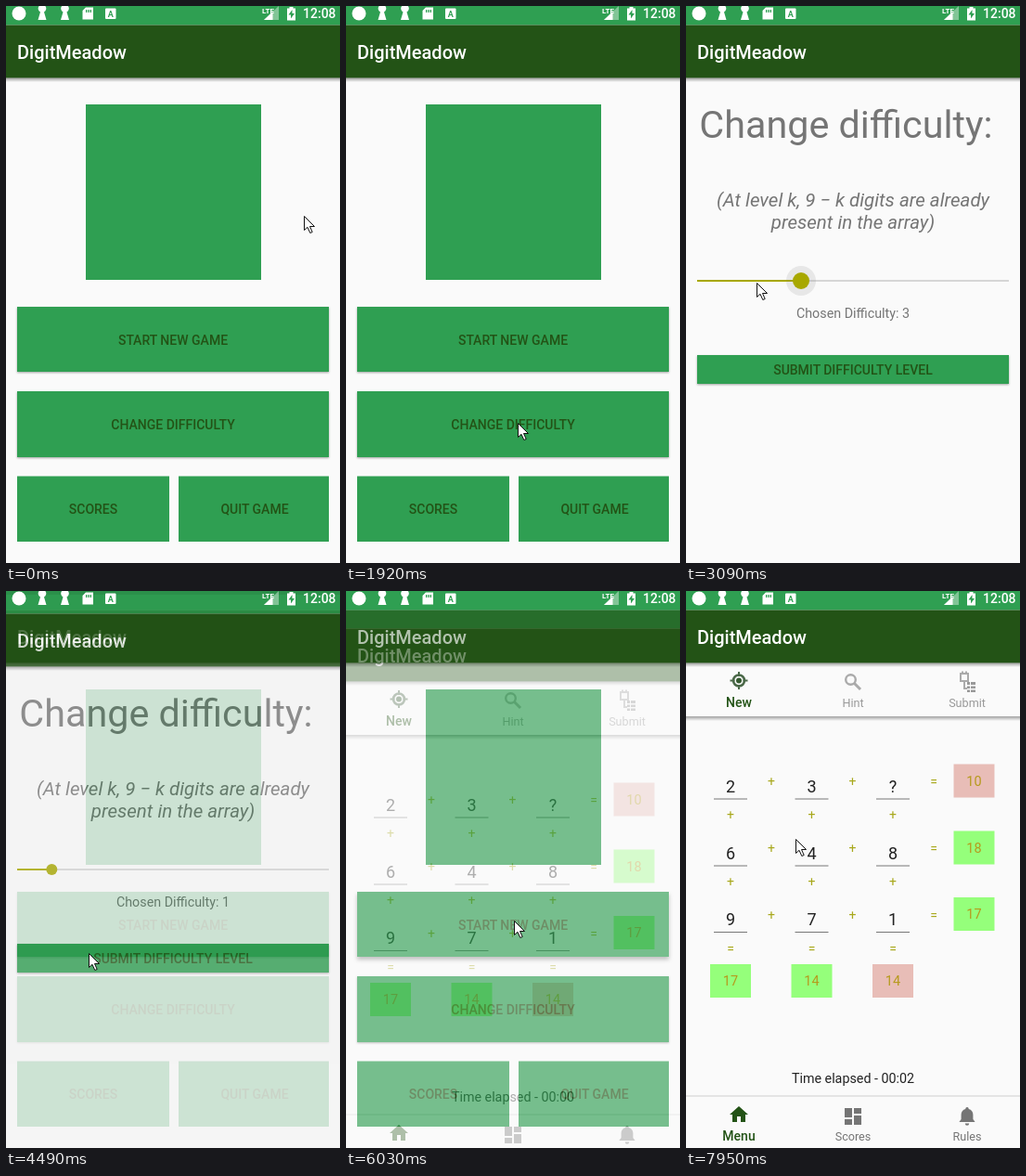
An HTML page for the animation above (8000 ms loop, 360 by 600 pixels).

```html
<!DOCTYPE html>
<html lang="en">
<head>
<meta charset="utf-8">
<title>Number puzzle</title>
<style>
  html, body { margin: 0; width: 100%; height: 100%; overflow: hidden; background: #fafafa; }
  svg { display: block; width: 360px; height: 600px; font-family: Roboto, sans-serif; }
  .green { fill: #2f9f52; }
  .dark { fill: #235316; }
  .raised { filter: drop-shadow(0 1px 1px rgba(0, 0, 0, .35)); }
  .mid text, text.mid { text-anchor: middle; }
  .caps { font-size: 14px; font-weight: 500; fill: #235316; }
  .grey { fill: #757575; }
  .soft { fill: #999; }
  .label { font-size: 12.6px; }
  .active { font-size: 14px; font-weight: 500; fill: #235316; }
  .digit { font-size: 18px; fill: #222; }
  .sign { font-size: 14px; fill: #a8a81c; }
  .sum { font-size: 14.5px; fill: #b69a1c; }
</style>
</head>
<body>
<svg viewBox="0 0 360 600">
  <defs>
    <linearGradient id="fade" x2="0" y2="1">
      <stop offset="0" stop-color="#000" stop-opacity=".36"/>
      <stop offset="1" stop-color="#000" stop-opacity="0"/>
    </linearGradient>
    <g id="bars">
      <rect width="360" height="600" fill="#fafafa"/>
      <rect class="green" width="360" height="20.5"/>
      <rect class="dark" y="20.5" width="360" height="57"/>
      <rect y="77.5" width="360" height="4.5" fill="url(#fade)"/>
      <text x="12" y="57" font-size="20" font-weight="500" fill="#fff">DigitMeadow</text>
    </g>
    <path id="pawn" fill="#fff" d="M-2 6.5a4.3 4.3 0 1 1 4 0L4.5 15h-9z"/>
  </defs>

  <g id="home">
    <use href="#bars"/>
    <rect class="green" x="86" y="106" width="189" height="189"/>
    <rect id="start" class="green raised" x="12" y="324" width="336" height="70"/>
    <rect id="change" class="green raised" x="12" y="415" width="336" height="71"/>
    <rect class="green" x="12" y="506.5" width="164" height="70.5"/>
    <rect class="green" x="186" y="506.5" width="162" height="70.5"/>
    <g class="mid caps">
      <text x="180" y="364.5">START NEW GAME</text>
      <text x="180" y="456">CHANGE DIFFICULTY</text>
      <text x="94" y="547">SCORES</text>
      <text x="268" y="547">QUIT GAME</text>
    </g>
    <rect id="dim" width="360" height="600" opacity="0"/>
  </g>

  <g id="level">
    <use href="#bars"/>
    <text class="grey" x="14.3" y="142" font-size="41.3">Change difficulty:</text>
    <g class="mid grey" font-size="20.5" font-style="italic">
      <text x="180" y="215.5">(At level k, 9 − k digits are already</text>
      <text x="180" y="240">present in the array)</text>
    </g>
    <path d="M12 296H348" stroke="#d6d6d6" stroke-width="2"/>
    <path id="filled" stroke="#a8a800" stroke-width="2"/>
    <circle id="halo" cy="296" r="16" fill="#888" fill-opacity=".16"/>
    <circle id="thumb" cy="296" fill="#a8a800"/>
    <text id="chosen" class="mid grey" x="180" y="336" font-size="14.3"></text>
    <rect id="submit" class="green raised" x="12" y="376" width="336" height="31"/>
    <text class="mid caps" x="180" y="397">SUBMIT DIFFICULTY LEVEL</text>
  </g>

  <g id="game">
    <use href="#bars"/>
    <rect y="135" width="360" height="5" fill="url(#fade)"/>
    <g fill="none" stroke="#4a6848">
      <circle cx="57" cy="96.5" r="6" stroke-width="2.5"/>
      <path d="M57 87v5m0 9v5M47.500 96.500h5m9 0h5" stroke-width="2"/>
    </g>
    <circle cx="57" cy="96.500" r="3" fill="#355a30"/>
    <g fill="none" stroke="#aaa">
      <circle cx="177.500" cy="95.500" r="5.300" stroke-width="2.400"/>
      <path d="M181.500 99.500L188 106" stroke-width="3"/>
      <path d="M296 89h8v8h-8zM298 86.500v2m4-2v2M300 97v8h3" stroke-width="2"/>
    </g>
    <path d="M303 98h3v3h-3zm4 0h5v3h-5zm-4 4.500h3v2.500h-3zm4 0h5v2.500h-5zm-4 4h3v2.500h-3zm4 0h5v2.500h-5z" fill="#999"/>
    <g class="mid label">
      <text class="active" x="57" y="125">New</text>
      <text class="soft" x="180" y="125">Hint</text>
      <text class="soft" x="303" y="125">Submit</text>
    </g>
    <g id="grid" class="mid"></g>
    <text id="clock" class="mid" x="180" y="530" font-size="14.3" fill="#222"></text>
    <path d="M0 544H360" stroke="#e4e4e4" stroke-width="2"/>
    <path class="dark" d="M57 555l10 9h-3v8h-5v-6h-4v6h-5v-8h-3z"/>
    <path class="grey" d="M171 557h8v10h-8zm10 0h8v6h-8zm-10 12h8v6h-8zm10-4h8v10h-8z"/>
    <path class="grey" d="M303 556c1.500 0 1.700 1 1.700 2 3 .8 4.700 3 4.700 6v5l2.200 3h-17.200l2.200-3v-5c0-3 1.700-5.200 4.700-6 0-1 .2-2 1.700-2zm-2.200 17.500h4.400a2.200 2.200 0 0 1-4.400 0z"/>
    <g class="mid label">
      <text class="active" x="57" y="592">Menu</text>
      <text class="grey" x="180" y="592">Scores</text>
      <text class="grey" x="303" y="592">Rules</text>
    </g>
  </g>

  <g id="status" fill="#fff">
    <circle cx="14" cy="8" r="7.500"/>
    <use href="#pawn" x="39"/>
    <use href="#pawn" x="63.500"/>
    <path d="M86 1.500h8v13H82.500V5z"/>
    <path class="green" d="M86 4h1.300v3H86zm2.300 0h1.300v3h-1.300zm2.300 0h1.300v3h-1.300z"/>
    <rect x="107" y="2.500" width="11.500" height="11.500" rx="1"/>
    <text class="mid green" x="112.800" y="11.500" font-size="9" font-weight="700">A</text>
    <path d="M294 0V15H278z" opacity=".4"/>
    <path d="M287.500 6V15H278z"/>
    <text x="276" y="7.500" font-size="8" font-weight="700">LTE</text>
    <path d="M303 2.500h2.500V1h4v1.500h2.500V15.500h-9z"/>
    <path class="green" d="M308.500 4l-4 5.500h2.500v4l4-5.500h-2.500z"/>
    <text x="320" y="13" font-size="14" font-weight="500">12:08</text>
  </g>

  <path id="cursor" d="M.5.5V15.500L4 12.300l2.800 6.200 2.400-1-2.700-6H11.500z" fill="#fff" stroke="#111"/>
</svg>
<script>
const LOOP = 8000;
const $ = id => document.getElementById(id);
const el = Object.fromEntries(
  ['start', 'change', 'submit', 'dim', 'level', 'game', 'filled', 'halo', 'thumb', 'chosen', 'clock', 'cursor']
    .map(id => [id, $(id)]));

// Puzzle board
const cols = [48, 135.5, 223], rows = [216, 288, 359.5];
const text = (kind, x, y, s) => `<text class="${kind}" x="${x}" y="${y}">${s}</text>`;
const total = (x, y, n, ok) =>
  `<rect x="${x - 22}" y="${y - 24}" width="44" height="36" fill="${ok ? '#95ff7b' : '#e8bdb7'}"/>` +
  text('sum', x, y - 1, n);
let board = '';
rows.forEach((y, r) => {
  cols.forEach((x, c) => {
    board += text('digit', x, y + .5, ['23?', '648', '971'][r][c]) +
      `<path d="M${x - 18} ${y + 8}h36" stroke="#777"/>` +
      text('sign', x + 44, y - 6, c < 2 ? '+' : '=') +
      text('sign', x, y + 30, r < 2 ? '+' : '=');
  });
  board += total(310.5, y - 5.5, [10, 18, 17][r], r > 0);
});
cols.forEach((x, c) => board += total(x, 426, [17, 14, 14][c], c < 2));
$('grid').innerHTML = board;

// Pointer moves: first step, last step, number of steps, points on the way
const moves = [
  [380, 1150, 11, [[321, 226], [288, 325], [228, 425], [199, 451]]],
  [1230, 1690, 7, [[199, 451], [185, 449]]],
  [2003, 2310, 5, [[185, 449], [222, 365], [237, 301]]],
  [2460, 2460, 1, [[237, 301], [237, 300]]],
  [2630, 3090, 7, [[237, 300], [170, 297], [120, 296], [76, 298]]],
  [3168, 3400, 4, [[76, 298], [46, 299]]],
  [3700, 3940, 4, [[46, 299], [65, 345], [89, 390]]],
  [4880, 5340, 7, [[89, 390], [81, 425], [95, 450], [118, 457], [142, 449], [167, 422], [180, 382], [181, 357]]],
  [6030, 6260, 4, [[181, 357], [180, 345]]],
  [6420, 7180, 11, [[180, 345], [120, 310], [60, 240], [85, 180], [160, 166], [215, 185]]],
  [7260, 7950, 10, [[215, 185], [245, 235], [225, 285], [165, 295], [118, 267]]]
];

// Number of steps done at time t
function steps(t, from, to, n) {
  if (t < from) return 0;
  const gap = (to - from) / (n - 1) || 1;
  return Math.min(n, Math.floor((t - from + 8) / gap) + 1);
}

function spline(pts, p) {
  const last = pts.length - 1;
  const i = Math.min(last - 1, Math.floor(p * last)), u = p * last - i;
  const at = k => pts[Math.max(0, Math.min(last, k))];
  return [0, 1].map(k => {
    const [a, b, c, d] = [at(i - 1)[k], at(i)[k], at(i + 1)[k], at(i + 2)[k]];
    return b + u / 2 * (c - a + u * (2 * a - 5 * b + 4 * c - d + u * (3 * (b - c) + d - a)));
  });
}

function pointer(t) {
  const [from, to, n, pts] = moves.findLast(m => t >= m[0]) || moves[0];
  return spline(pts, steps(t, from, to, n) / n).map(Math.round);
}

function place(win, alpha, y) {
  win.setAttribute('opacity', alpha);
  win.setAttribute('transform', `translate(0 ${y})`);
}

function lift(button, k) {
  button.style.filter = `drop-shadow(0 ${1 + 3 * k}px ${1 + 1.5 * k}px rgba(0,0,0,.35))`;
}

// Windows rise while fading in, and sink while fading out
const rise = [[0, 48], [.35, 20], [.8, 8], [1, 2], [1, 0]];
const sink = [[1, 0], [.78, 4], [.25, 18], [0, 48]];

function draw(t) {
  const [x, y] = pointer(t);
  el.cursor.setAttribute('transform', `translate(${x} ${y})`);

  const closing = steps(t, 4490, 4650, 3);
  const levelPose = closing ? sink[closing] : rise[steps(t, 2003, 2233, 4)];
  place(el.level, ...levelPose);
  place(el.game, ...rise[steps(t, 6030, 6260, 4)]);
  el.dim.setAttribute('opacity', closing ? .12 * levelPose[0] : 0);

  lift(el.change, Math.sin(Math.PI * steps(t, 1230, 1690, 7) / 7));
  lift(el.submit, t >= 4180 && t < 4340 ? .5 : 0);
  lift(el.start, t >= 5720 ? .7 : 0);

  const value = t < 3165 ? 3 : t < 3240 ? 2 : 1;
  const knob = 12 + value * 336 / 9;
  el.filled.setAttribute('d', `M12 296H${knob}`);
  el.halo.setAttribute('cx', knob);
  el.halo.setAttribute('opacity', t >= 2860 && t < 3395 ? 1 : 0);
  el.thumb.setAttribute('cx', knob);
  el.thumb.setAttribute('r', t >= 2860 && t < 3700 ? 9 : 6);
  el.chosen.textContent = `Chosen Difficulty: ${value}`;

  const secs = Math.max(0, Math.floor((t - 5880) / 1000));
  el.clock.textContent = `Time elapsed - 00:0${secs}`;
}

const begin = performance.now();
function tick() {
  draw((performance.now() - begin) % LOOP);
  requestAnimationFrame(tick);
}
tick();
</script>
</body>
</html>
```
